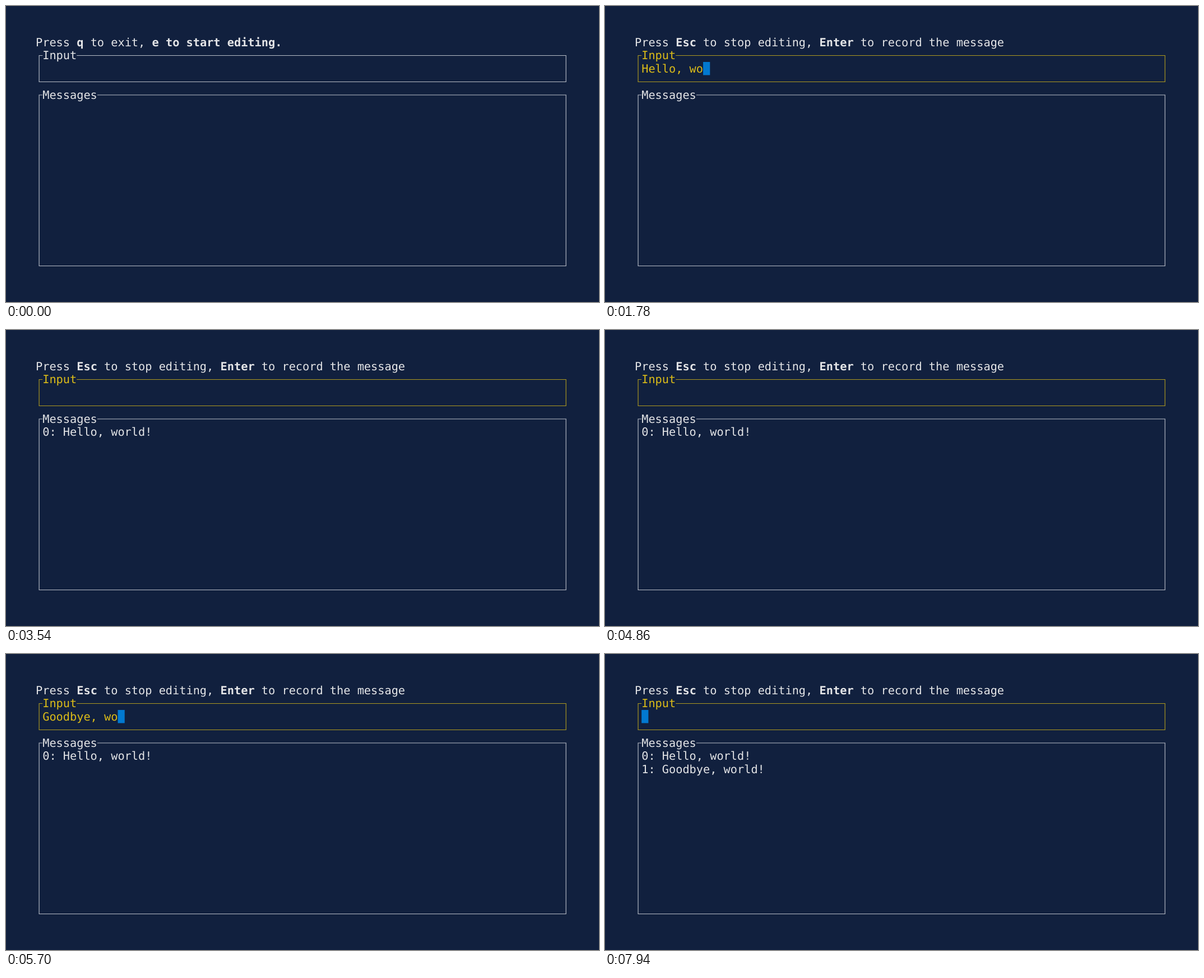
An HTML page that plays this animation: 1058x529 px, repeating every 8000 ms.

```html
<!DOCTYPE html>
<html lang="en">
<head>
<meta charset="utf-8">
<title>Terminal input</title>
<style>
  html, body { margin: 0; width: 100%; height: 100%; overflow: hidden; background: #11203e; }
  svg { display: block; width: 1058px; height: 529px; }
  text {
    font: 20.277px "DejaVu Sans Mono", Menlo, monospace;
    fill: #e4e5e7;
    white-space: pre;
    text-rendering: geometricPrecision;
  }
  .bold { font-weight: bold; }
  path { fill: none; stroke: #b9bec7; stroke-width: 1.15; }
  .editing text { fill: #dcbc18; }
  .editing path { stroke: #ae9a1f; }
  #cursor { fill: #0279d0; }
</style>
</head>
<body>
<svg id="stage" viewBox="0 0 1058 529"></svg>
<script>
const LOOP = 8000, TICK = 40;
const CELL = 12.208, ROW = 23.5, ORIGIN = 53, BASELINE = 18.8;
const COLS = 78;
const stage = document.getElementById('stage');

const colX = col => ORIGIN + col * CELL;
const rowY = row => ORIGIN + row * ROW;

function add(parent, tag, attrs = {}) {
  const el = document.createElementNS('http://www.w3.org/2000/svg', tag);
  for (const key in attrs) el.setAttribute(key, attrs[key]);
  return parent.appendChild(el);
}

function addText(parent, col, row, content = '', cls = '') {
  const el = add(parent, 'text', { x: colX(col), y: rowY(row) + BASELINE, class: cls });
  el.textContent = content;
  return el;
}

// Parts between asterisks are bold.
function addHelp(markup) {
  const group = add(stage, 'g');
  let col = 0;
  markup.split('*').forEach((part, i) => {
    addText(group, col, 0, part, i % 2 ? 'bold' : '');
    col += part.length;
  });
  return group;
}

// A bordered box whose top line leaves room for its title.
function addBox(title, top, bottom) {
  const group = add(stage, 'g');
  const left = colX(0.5), right = colX(COLS - 0.5);
  const y1 = rowY(top + 0.5) + 0.2, y2 = rowY(bottom + 0.5) + 0.2;
  add(group, 'path', {
    d: `M${colX(1)} ${y1}H${left}V${y2}H${right}V${y1}H${colX(1 + title.length)}`
  });
  addText(group, 1, top, title);
  return group;
}

const idleHelp = addHelp('Press *q* to exit, *e to start editing.*');
const editHelp = addHelp('Press *Esc* to stop editing, *Enter* to record the message');
const inputBox = addBox('Input', 1, 3);
const messageBox = addBox('Messages', 3 + 1, 17);
const cursor = add(stage, 'rect', { id: 'cursor', y: rowY(2), width: CELL, height: ROW });
const input = addText(inputBox, 1, 2);

const EDIT_START = 500;
const entries = [
  { text: 'Hello, world!', start: 1420, end: 2020 },
  { text: 'Goodbye, world!', start: 5220, end: 5940 }
];
entries.forEach((entry, i) => {
  entry.line = addText(messageBox, 1, 5 + i, `${i}: ${entry.text}`);
});

// Each time flips the cursor, which is hidden at first.
const blinks = [540, 1020, 1420, 2540, 3060, 3540, 3740, 4860, 5220, 6420, 6940, 7420, 7940];

function typedText({ text, start, end }, t) {
  if (t < start || t >= end) return '';
  const ticks = Math.floor((t - start) / TICK);
  const perKey = (end - start) / TICK / text.length;
  let count = 1;
  while (count < text.length && Math.floor(count * perKey + 1e-6) <= ticks) count++;
  return text.slice(0, count);
}

const show = (el, on) => el.setAttribute('visibility', on ? 'visible' : 'hidden');

function render(t) {
  const editing = t >= EDIT_START;
  show(idleHelp, !editing);
  show(editHelp, editing);
  inputBox.setAttribute('class', editing ? 'editing' : '');

  const typed = entries.map(entry => typedText(entry, t)).join('');
  input.textContent = typed;
  cursor.setAttribute('x', colX(1 + typed.length));
  show(cursor, blinks.filter(time => time <= t).length % 2 === 1);
  entries.forEach(entry => show(entry.line, t >= entry.end));
}

const began = performance.now();
function frame() {
  render((performance.now() - began) % LOOP);
  requestAnimationFrame(frame);
}
render(0);
requestAnimationFrame(frame);
</script>
</body>
</html>
```
